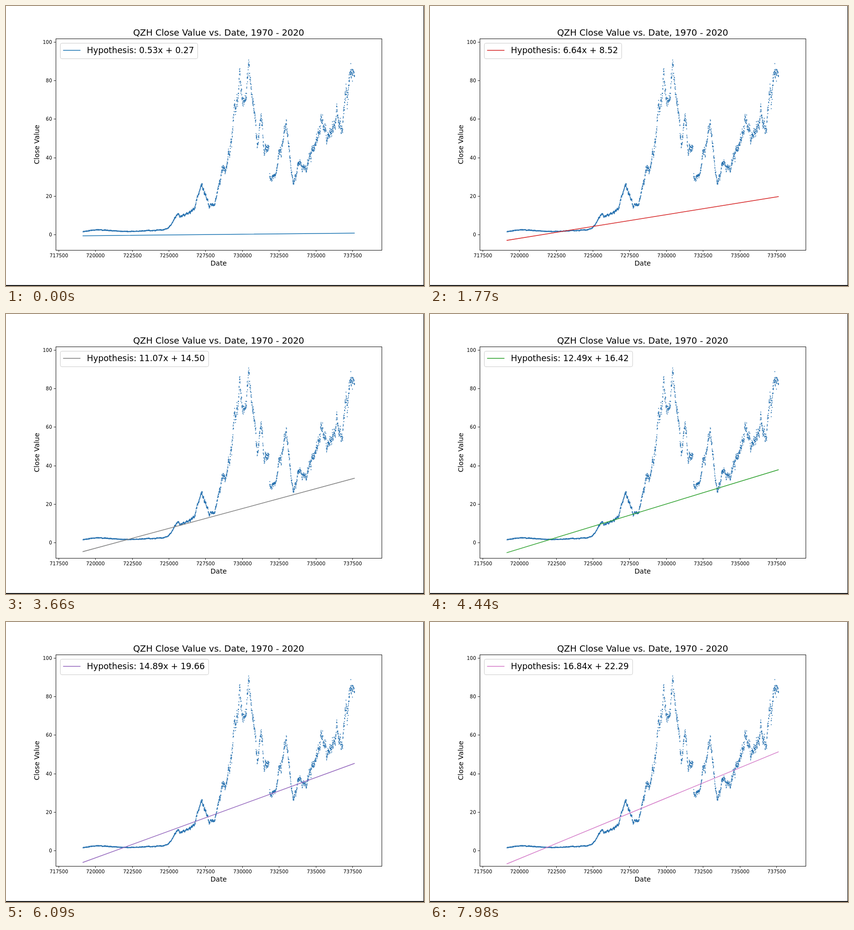
An HTML page for the animation above (8000 ms loop, 858 px wide and 576 px high).

```html
<!DOCTYPE html>
<html lang="en">
<head>
<meta charset="utf-8">
<title>Linear regression fit</title>
<style>
  html, body { margin: 0; width: 100%; height: 100%; overflow: hidden; background: #fff; }
  svg { display: block; width: 858px; height: 576px; }
  text { font-family: "DejaVu Sans", sans-serif; fill: #000; }
</style>
</head>
<body>
<svg id="stage" viewBox="0 0 858 576" width="858" height="576"></svg>
<script>
const LOOP = 8000, STEP = 30;
const COLORS = ['#1f77b4', '#ee8033', '#2ca02c', '#d62728', '#9467bd',
                '#8c564b', '#d47bc8', '#7f7f7f', '#b0bd3a', '#17becf'];

// Main turning points of the price curve, in stage pixels
const TURNS = [
  [158, 464], [190, 460], [212, 462], [250, 464], [322, 461], [333, 457], [352, 427],
  [358, 435], [387, 418], [401, 367], [418, 409], [428, 411], [445, 338], [450, 345],
  [480, 165], [490, 205], [498, 130], [516, 280], [524, 240], [531, 290], [540, 293],
  [541, 350], [552, 350], [575, 245], [590, 370], [600, 325], [616, 338], [650, 238],
  [663, 268], [680, 215], [688, 250], [708, 125], [715, 155]
];

// Descent progress: [step, intercept, plots so far]
const FIT = [[0, 0.27, 0], [34, 5.41, 38], [84, 11.21, 88], [122, 14.5, 127],
             [174, 18.07, 177], [232, 20.99, 231], [266, 22.29, 266]];
const LIMIT = 28;

const stage = document.getElementById('stage');

function add(tag, attrs, text) {
  const el = document.createElementNS('http://www.w3.org/2000/svg', tag);
  for (const key in attrs) el.setAttribute(key, attrs[key]);
  if (text !== undefined) el.textContent = text;
  stage.appendChild(el);
  return el;
}

const label = (x, y, size, text, anchor = 'middle', extra = {}) =>
  add('text', { x, y, 'font-size': size, 'text-anchor': anchor, ...extra }, text);

const px = date => 108 + (date - 717500) * 75.36 / 2500;
const py = value => 470.4 - value * 3.958;

let seed = 20;
function random() {
  seed = (seed * 1664525 + 1013904223) % 4294967296;
  return seed / 4294967296;
}
const jitter = () => random() + random() + random() - 1.5;

// Segment of a key list that holds x, and the position inside it
function segment(keys, x) {
  let k = 0;
  while (k < keys.length - 2 && x > keys[k + 1][0]) k++;
  const from = keys[k], to = keys[k + 1];
  return { from, to, u: (x - from[0]) / (to[0] - from[0]) };
}

// Weekly closes: the curve plus correlated noise that grows with the price
function pricePath() {
  const week = 0.211;
  let d = '', drift = 0;
  for (let x = 158; x < 715.5; x += week) {
    const { from, to, u } = segment(TURNS, x);
    if (to[0] - from[0] === 1) continue;
    const mid = from[1] + (to[1] - from[1]) * u;
    drift = 0.9 * drift + 0.036 * jitter();
    const y = mid + (470 - mid) * (drift + 0.025 * jitter()) + 0.6 * jitter();
    d += `M${x.toFixed(1)} ${y.toFixed(1)}h0`;
  }
  return d;
}

function drawChart() {
  add('rect', { width: 858, height: 576, fill: '#fff' });
  add('path', { d: pricePath(), fill: 'none', stroke: '#2872b0',
                'stroke-width': 1.9, 'stroke-linecap': 'round' });
  const fit = add('path', { fill: 'none', 'stroke-width': 1.5, 'stroke-linecap': 'square' });

  let ticks = '';
  for (let date = 717500; date <= 737500; date += 2500) {
    const x = Math.round(px(date)) + 0.5;
    ticks += `M${x} 502v4`;
    label(x, 517, 10, date);
  }
  for (let value = 0; value <= 100; value += 20) {
    const y = Math.round(py(value) - 0.5) + 0.5;
    ticks += `M102 ${y}h-4`;
    label(94.5, y + 3.5, 10, value, 'end');
  }
  add('path', { d: ticks, stroke: '#000', 'stroke-width': 0.8 });
  add('rect', { x: 102.5, y: 67.5, width: 669, height: 435, fill: 'none',
                stroke: '#000', 'stroke-width': 0.9 });

  label(436.5, 61, 18, 'QZH Close Value vs. Date, 1970 - 2020');
  label(436.5, 534, 14, 'Date');
  label(0, 0, 14, 'Close Value', 'middle', { transform: 'translate(68 285) rotate(-90)' });

  const box = add('rect', { x: 111.5, y: 76.5, height: 32, rx: 3.4, fill: '#fff',
                            'fill-opacity': 0.8, stroke: '#ccc' });
  const key = add('path', { d: 'M118 91.3H152', 'stroke-width': 1.6, 'stroke-linecap': 'square' });
  const text = label(166, 97, 17.3, '', 'start');

  add('path', { d: 'M857.5 0V576', stroke: '#000' });
  add('path', { d: 'M0 575H858', stroke: '#111', 'stroke-width': 2 });
  return { fit, box, key, text };
}

// Exponential approach to the limit between key steps
function stateAt(n) {
  const { from: [, b1, c1], to: [, b2, c2], u } = segment(FIT, n);
  const b = LIMIT - (LIMIT - b1) * Math.pow((LIMIT - b2) / (LIMIT - b1), u);
  const m = 0.53 + 0.7405 * (b - 0.27);
  return { b, m, plots: Math.round(c1 + (c2 - c1) * u) };
}

const chart = drawChart();
let shown = -1;

function render(time) {
  const n = Math.floor((time % LOOP) / STEP);
  if (n === shown) return;
  shown = n;
  const now = stateAt(n), drawn = stateAt(n - 1);
  const color = COLORS[now.plots % COLORS.length];
  const m = now.m.toFixed(2), b = now.b.toFixed(2);
  const reach = 1.731 * drawn.m;
  chart.fit.setAttribute('d', `M158 ${py(drawn.b - reach)}L715 ${py(drawn.b + reach)}`);
  chart.fit.setAttribute('stroke', color);
  chart.key.setAttribute('stroke', color);
  chart.text.textContent = `Hypothesis: ${m}x + ${b}`;
  chart.box.setAttribute('width', 282 + 11.2 * (m.length + b.length - 8));
}

function tick() {
  render(performance.now());
  requestAnimationFrame(tick);
}
tick();
</script>
</body>
</html>
```
